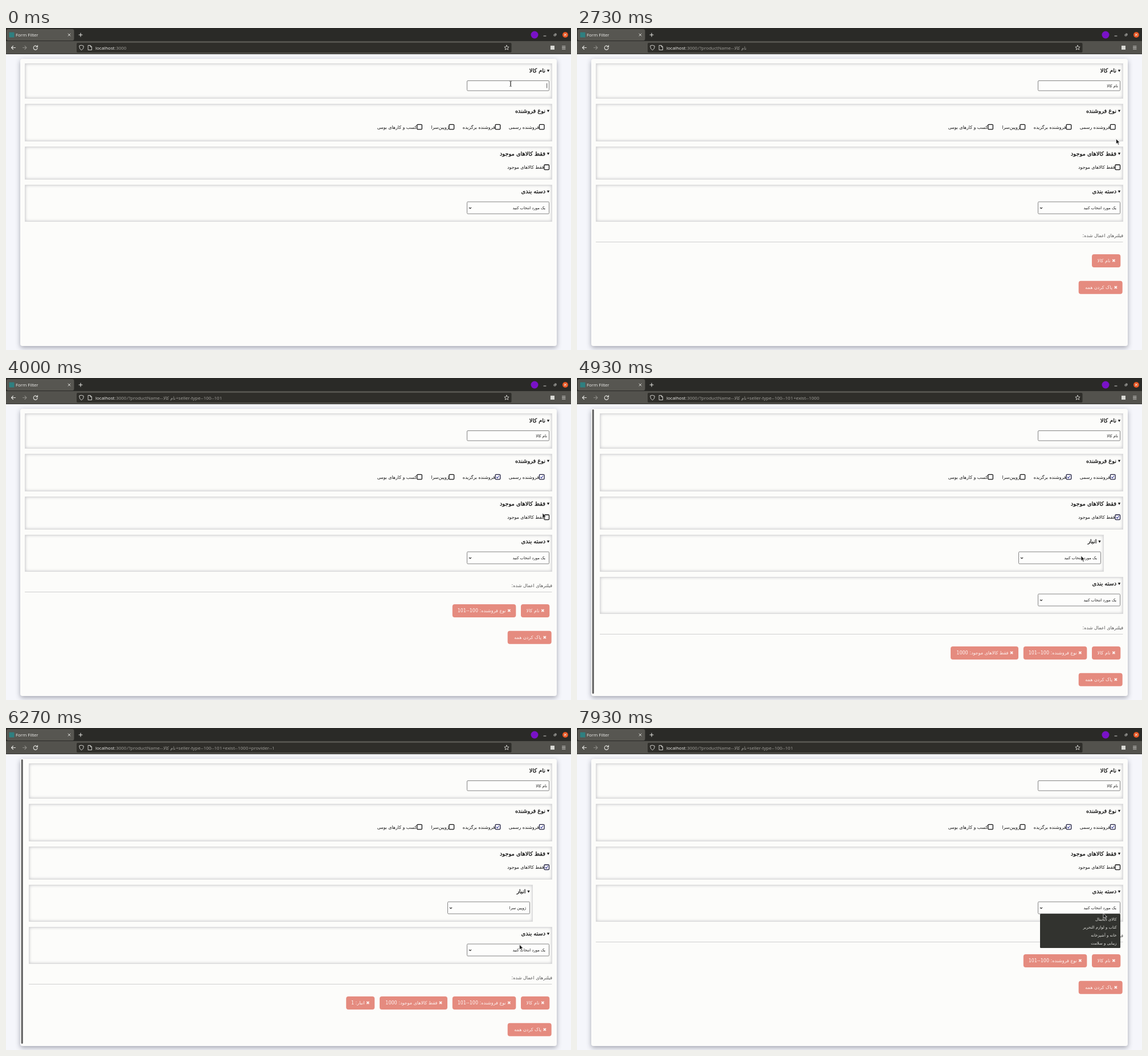
An HTML page that plays this animation: 992 px wide and 565 px high, repeating every 8 s.

```html
<!DOCTYPE html>
<html lang="fa">
<head>
<meta charset="utf-8">
<title>Form Filter</title>
<style>
html, body { margin: 0; width: 100%; height: 100%; overflow: hidden; background: #f5f6fb; }
#stage { position: absolute; left: 0; top: 0; width: 992px; height: 565px; overflow: hidden; }
#card { position: absolute; left: 25px; top: 54px; width: 942px; height: 503.5px; border-radius: 4px;
  background: #fcfcfa; box-shadow: 0 3px 8px rgba(50, 55, 75, .42); }
.group { position: absolute; box-sizing: border-box; border: 1px solid #dcdcdc; box-shadow: inset 0 0 5px #c4c4c8; }
svg { position: absolute; left: 0; top: 0; }
text { white-space: pre; }
.fa { font-family: "DejaVu Sans", sans-serif; direction: rtl; }
.ui { font-family: "Open Sans", "Noto Sans", sans-serif; font-size: 8px; }
.head { font-size: 9.8px; stroke: #111; stroke-width: .3px; }
.line { fill: none; stroke: #e4e4e0; stroke-width: 1.1; stroke-linecap: round; stroke-linejoin: round; }
</style>
</head>
<body>
<div id="stage">
  <div id="card"></div>
  <div id="groups"></div>
  <svg id="chrome" width="992" height="565" viewBox="0 0 992 565">
    <rect width="992" height="24" fill="#2a2a27"/>
    <rect x="1" y="2" width="118.500" height="20" rx="3" fill="#575651"/>
    <rect y="23" width="992" height="22.500" fill="#53524d"/>
    <rect y="45" width="992" height="1" fill="#383733"/>
    <rect x="124" y="26" width="763.500" height="17" rx="2" fill="#2f2e2a"/>
    <rect x="5.500" y="7.500" width="9" height="9" fill="#2f7f80"/>
    <text class="ui" x="17" y="15" fill="#f1f1ee" style="font-size:7.800px">Form Filter</text>
    <g class="line">
      <path d="M109 10l4 4m0-4l-4 4" stroke-width=".9"/>
      <path d="M128 12h6m-3-3v6"/>
      <path d="M16.500 34.500h-7m3-3l-3 3 3 3"/>
      <path d="M29.500 34.500h6.500m-3-3l3 3-3 3" stroke="#8b8a85"/>
      <path d="M54.500 32.500a3.500 3.500 0 1 0 .7 2.700M55.500 30.500v2.700h-2.700"/>
      <path d="M132.500 30.300l3.700 1.200c0 3.500-1 5.800-3.700 7.200c-2.700-1.400-3.700-3.700-3.700-7.200z" stroke-width=".9"/>
      <path d="M144.500 30.500h3.500l2.500 2.500v5.500h-6zM148 30.500v2.500h2.500" stroke-width=".9"/>
      <path d="M879 30.300l1.200 2.700 2.900.3-2.200 1.900.7 2.900-2.600-1.500-2.600 1.500.7-2.900-2.200-1.900 2.900-.3z" stroke-width=".8"/>
      <path d="M976.500 32h5.500m-5.500 2.500h5.500m-5.500 2.500h5.500" stroke-width=".9"/>
      <path d="M944 14h4" stroke-width=".9"/>
      <path d="M962.500 11.300h2.500v2.500h-2.500zM963.800 10h2.200v2.400" stroke-width=".7"/>
    </g>
    <rect x="956" y="31" width="7" height="7" fill="#d8d8d4"/>
    <circle cx="928" cy="12" r="6.500" fill="#7912c8"/>
    <circle cx="982" cy="12" r="5" fill="#e95420"/>
    <path class="line" d="M980.300 10.300l3.400 3.400m0-3.400l-3.400 3.400" stroke-width=".9"/>
  </svg>
  <svg id="view" width="992" height="565" viewBox="0 0 992 565"></svg>
</div>
<script>
const LOOP = 8000;
const NAME = 'نام کالا';
const STORE = 'ژوپین سرا';
const PICK = 'یک مورد انتخاب کنید';
const KEYS = [400, 590, 780, 960, 1260, 1540, 1720, 1880];
const CLICK = { official: 3050, chosen: 3500, exist: 4250, open: 5040, option: 5570, clear: 7100, category: 7680 };
const PATH = [
  [0, 886, 98], [2250, 886, 98], [2730, 946.5, 194.5], [2950, 941, 174], [3150, 941, 174],
  [3400, 863, 174], [3600, 863, 174], [4000, 942, 237], [4150, 948, 244], [4350, 948, 244],
  [4930, 885, 312], [5150, 885, 312], [5450, 890, 333], [5700, 890, 333], [6270, 901.5, 380],
  [6500, 905, 384], [7000, 948, 244], [7200, 948, 244], [7600, 922, 316], [7750, 922, 316],
  [7930, 924, 325], [8000, 924, 325]
];
const byId = id => document.getElementById(id);
const pen = document.createElement('canvas').getContext('2d');

function widthOf(str, size) {
  pen.font = size + 'px "DejaVu Sans", sans-serif';
  return pen.measureText(str).width;
}

function pointer(t) {
  let i = 1;
  while (PATH[i][0] < t && i < PATH.length - 1) i++;
  const [t0, x0, y0] = PATH[i - 1], [t1, x1, y1] = PATH[i];
  const u = Math.min(1, (t - t0) / (t1 - t0)), e = u * u * (3 - 2 * u);
  return [x0 + (x1 - x0) * e, y0 + (y1 - y0) * e];
}

const fa = (x, y, str, size, fill = '#151515') =>
  `<text class="fa" x="${x}" y="${y}" font-size="${size}" fill="${fill}">${str}</text>`;

const url = (x, str, fill = '#a3a29d') =>
  `<text class="ui" x="${x}" y="37.500" fill="${fill}">${str}</text>`;

const group = (x, y, right, bottom) =>
  `<div class="group" style="left:${x}px;top:${y}px;width:${right - x}px;height:${bottom - y}px"></div>`;

const title = (x, y, str) =>
  `<path d="M${x + 2.8} ${y - 1.8}h4.400l-2.200 4z" fill="#111"/>` +
  `<text class="fa head" x="${x}" y="${y + 3.2}" fill="#111">${str}</text>`;

const field = (x, y, h) =>
  `<rect x="${x + .5}" y="${y + .5}" width="144" height="${h}" rx="1.500" fill="#fdfdfc" stroke="#777" stroke-width=".9"/>`;

function select(x, y, str) {
  return field(x, y, 21) + fa(x + 138, y + 13, str, 6.8) +
    `<path d="M${x + 4} ${y + 10.3}l2 2 2-2" fill="none" stroke="#222" stroke-width="1.100"/>`;
}

function check(x, y, str, on) {
  const edge = on ? '#1c1c3c' : '#111';
  return `<rect x="${x + .7}" y="${y + .7}" width="8.600" height="8.600" rx="1.300" fill="#fff" stroke="${edge}" stroke-width="1.300"/>` +
    (on ? `<path d="M${x + 2.7} ${y + 5.1}l1.600 1.800 3-4" fill="none" stroke="#3d3f9c" stroke-width="1.200"/>` : '') +
    fa(x + .3, y + 8, str, 7.9);
}

function chip(right, y, w, str) {
  return `<rect x="${right - w}" y="${y}" width="${w}" height="23" rx="4" fill="#e58b7f"/>` +
    fa(right - 8.5, y + 14.3, '✖ ' + str, 8, '#fdf3f1');
}

function popup(x, items) {
  return `<rect x="${x}" y="326" width="141" height="${items.length * 14 + 4}" rx="1.500" fill="#32332f"/>` +
    items.map((str, i) => fa(x + 134.5, 338 + i * 14, str, 6.9, '#e2e2de')).join('');
}

function cursor(x, y) {
  if (y > 91 && y < 111 && x > 809)
    return `<path d="M${x - 1.7} ${y - 4.5}q1.700 0 1.700 1v7q0 1-1.700 1M${x + 1.7} ${y - 4.5}q-1.700 0-1.700 1v7q0 1 1.700 1" fill="none" stroke="#222" stroke-width=".8"/>`;
  return `<path d="M${x} ${y}v9l2.100-1.900 1.500 3.300 1.600-.7-1.500-3.200h2.800z" fill="#1b1b1b" stroke="#f4f4f4" stroke-width=".7"/>`;
}

function draw(t) {
  const typed = NAME.slice(0, KEYS.filter(k => t >= k).length);
  const official = t >= CLICK.official, chosen = t >= CLICK.chosen;
  const exist = t >= CLICK.exist && t < CLICK.clear;
  const stocked = exist && t >= CLICK.option;
  const left = exist ? 40 : 33, dy = exist ? 74 : 0;

  let boxes = group(left, 62, 959, 124) + group(left, 133, 959, 199) +
    group(left, 208, 959, 266) + group(left, 275 + dy, 959, 340 + dy);
  if (exist) boxes += group(40, 275, 924.5, 340);

  let out = url(157, 'localhost', '#f3f3f0') + url(191, ':3000');
  if (typed) {
    out += url(212, '/?productName--') +
      `<text class="fa" style="direction:ltr" x="276" y="37.500" font-size="7.500" fill="#a3a29d">${typed}</text>`;
    if (official) out += url(298, '+seller-type--100' + (chosen ? '--101' : ''));
    if (exist) out += url(380, '+exist--1000');
    if (stocked) out += url(426, '+provider--1');
  }

  out += title(947, 75, NAME) + field(809, 92, 17.5) + fa(950, 103.5, typed, 6.9);
  if (t < 2450 && (t < 300 || typed)) {
    const x = 949.7 - widthOf(typed, 6.9);
    out += `<path d="M${x} 97v8.500" stroke="#222" stroke-width=".8"/>`;
  }

  out += title(947, 145.5, 'نوع فروشنده') +
    check(935.7, 168.6, 'فروشنده رسمی', official) +
    check(858.4, 168.6, 'فروشنده برگزیده', chosen) +
    check(777.3, 168.6, STORE.replace(' ', '\u200c'), false) +
    check(721, 168.6, 'کسب و کارهای بومی', false) +
    title(947, 220.5, 'فقط کالاهای موجود') +
    check(944.2, 239.3, 'فقط کالاهای موجود', exist);

  if (exist) {
    out += '<rect x="26.700" y="55" width="3" height="499" rx="1.500" fill="#5c5c5c"/>' +
      title(912.5, 287, 'انبار') + select(775, 304.5, stocked ? STORE : PICK);
  }
  out += title(947, 287 + dy, 'دسته بندی') + select(809, 304.5 + dy, PICK);

  if (typed) {
    out += fa(959, 367 + dy, 'فیلترهای اعمال شده:', 8, '#555') +
      `<path d="M${left} ${375.5 + dy}H958.500" stroke="#cfcfcf" stroke-width="1"/>`;
    const y = 397 + dy;
    if (typed === NAME) out += chip(954.3, y, 50.3, NAME);
    else out += chip(954.3, y, 57.3 + widthOf(typed, 8), NAME + ': ' + typed);
    if (official) out += chip(895.3, y, chosen ? 111.5 : 90.5, 'نوع فروشنده: 100' + (chosen ? '--101' : ''));
    if (exist) out += chip(775, y, 119, 'فقط کالاهای موجود: 1000');
    if (stocked) out += chip(647.2, y, 50, 'انبار: 1');
    out += chip(957.7, 443.7 + dy, 77, 'پاک کردن همه');
  }

  if (t >= CLICK.open && t < CLICK.option) out += popup(779, [STORE, 'فروشنده']);
  if (t >= CLICK.category)
    out += popup(813, ['کالای دیجیتال', 'کتاب و لوازم التحریر', 'خانه و آشپزخانه', 'زیبایی و سلامت']);

  return [boxes, out + cursor(...pointer(t))];
}

const shown = {};
function put(id, html) {
  if (shown[id] !== html) byId(id).innerHTML = shown[id] = html;
}

function tick() {
  const [boxes, art] = draw(performance.now() % LOOP);
  put('groups', boxes);
  put('view', art);
  requestAnimationFrame(tick);
}
tick();
</script>
</body>
</html>
```
